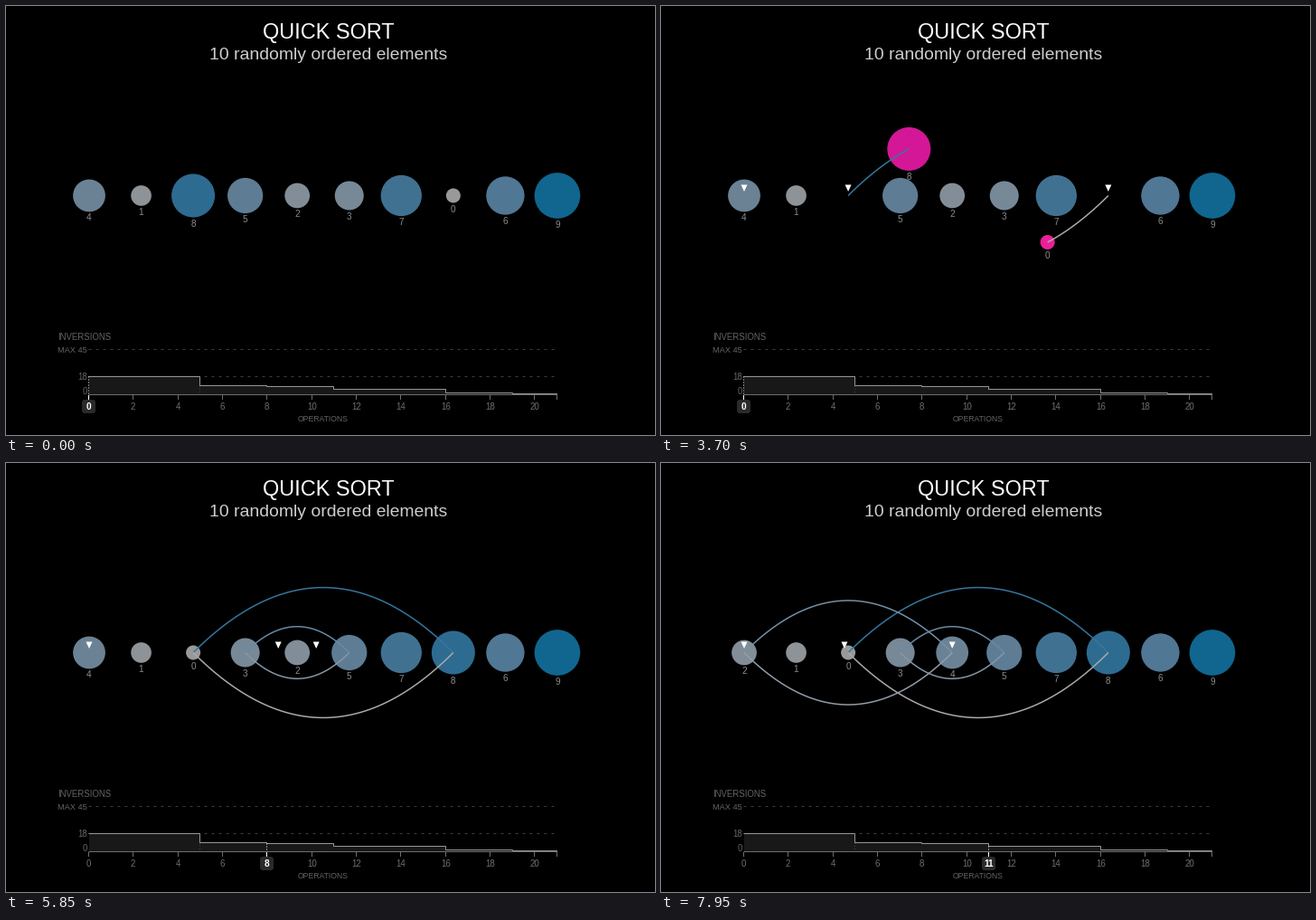
Animation of 718x474 px, one loop 8000 ms. Source, as a matplotlib script:

```python
import numpy as np
import matplotlib.pyplot as plt
from matplotlib.animation import FuncAnimation
from matplotlib.patches import Circle, FancyBboxPatch, Polygon, Rectangle

W, H, DPI = 718, 474, 100
STEP_MS = 50
FRAMES = 160
PX = 72 / DPI
LEFT, GAP, MID = 92, 57.55, 209.5
AXIS_X, OP_W, FLOOR, INV_H = 91.5, 24.66, 429.5, 50 / 45
MOVE = 500
PINK = np.array([255, 0, 153]) / 255

VALUES = [4, 1, 8, 5, 2, 3, 7, 0, 6, 9]
# start time, left slot, right slot, operations done afterwards
SWAPS = [(3506, 2, 7, 5), (5056, 3, 5, 8), (6584, 0, 4, 11)]
# start time and target slot of each hop
TRACKS = [
    [(1390, 0)],
    [(1390, 1), (1930, 2), (4052, 3), (5575, 4), (6077, 5),
     (7085, 1), (7581, 2)],
    [(1390, 10), (1930, 9), (2450, 8), (2975, 7), (4052, 6),
     (4554, 5), (5575, 4)],
]
INVERSIONS = [(0, 18), (5, 9), (8, 8), (11, 5), (16, 2), (19, 1), (21, 0)]

# linear RGB to white-scaled XYZ
XYZ = np.array([[0.4339, 0.3762, 0.1899],
                [0.2126, 0.7152, 0.0722],
                [0.0178, 0.1095, 0.8727]])

plt.rcParams["font.family"] = "Liberation Sans"
fig = plt.figure(figsize=(W / DPI, H / DPI), dpi=DPI, facecolor="black")
ax = fig.add_axes([0, 0, 1, 1])
ax.set_xlim(0, W)
ax.set_ylim(H, 0)
ax.axis("off")


def ease(u):
    u = min(max(u, 0), 1)
    return 4 * u ** 3 if u < 0.5 else 1 - 4 * (1 - u) ** 3


def slot_x(i):
    return LEFT + GAP * i


def crisp(v):
    """Centre of the pixel that holds v."""
    return np.floor(v + 1e-6) + 0.5


def op_x(n):
    return crisp(AXIS_X + OP_W * n)


def inv_y(v):
    return crisp(FLOOR - INV_H * v)


def gray(v):
    return (v / 255,) * 3


def label(x, y, s, size, color, ha="center", **kw):
    return ax.text(x, y, s, fontsize=size * PX, color=color, ha=ha,
                   va="baseline", **kw)


def line(xs, ys, color, width=1, **kw):
    kw.setdefault("solid_capstyle", "butt")
    return ax.plot(xs, ys, color=color, lw=width * PX, snap=False, **kw)[0]


def to_lab(rgb):
    return np.cbrt(XYZ @ ((np.array(rgb) / 255 + 0.055) / 1.055) ** 2.4)


def from_lab(lab):
    lin = np.linalg.solve(XYZ, lab ** 3)
    return np.clip(1.055 * np.clip(lin, 0, 1) ** (1 / 2.4) - 0.055, 0, 1)


def value_color(v):
    low, high = to_lab((153, 153, 153)), to_lab((16, 102, 143))
    return from_lab(low + (high - low) * v / 9)


# Headings
label(357, 36, "QUICK SORT", 23.5, "white")
label(357, 59, "10 randomly ordered elements", 19.4, gray(205))

# Inversions chart
label(57, 369, "INVERSIONS", 9.6, gray(100), "left")
label(90, 383, "MAX 45", 9.3, gray(100), "right")
label(90, 413, "18", 9.8, gray(100), "right")
label(90, 429, "0", 9.8, gray(100), "right")
label(351, 459, "OPERATIONS", 8.6, gray(100))
for v in (45, 18):
    line([op_x(0), op_x(21)], [inv_y(v)] * 2, gray(62), dashes=(3, 5),
         zorder=1)

ops, invs = zip(*INVERSIONS)
xs = np.repeat([op_x(n) for n in ops], 2)[1:]
ys = np.repeat([inv_y(v) for v in invs], 2)[:-1]
ax.fill_between(xs, ys, FLOOR, color=gray(24), lw=0, zorder=1.5)
line([op_x(0), op_x(21)], [FLOOR, FLOOR], gray(110), zorder=2)
line(xs, ys, gray(150), zorder=2, solid_joinstyle="miter")
line([op_x(5)] * 2, [420, 429], gray(70), dashes=(1, 2), zorder=2)

ticks = {}
for n in range(0, 21, 2):
    line([op_x(n)] * 2, [430, 435], gray(110), zorder=2)
    ticks[n] = label(op_x(n), 445.5, str(n), 9.8, gray(110))
line([op_x(21)] * 2, [429, 435], gray(110), zorder=2)

cursor = line([0, 0], [430, 435], "white", zorder=3)
cursor_dots = line([0, 0], [0, 0], "white", dashes=(1, 2), zorder=3)
badge = FancyBboxPatch((0, 437), 11, 11, fc=gray(42), ec="none", zorder=4,
                       boxstyle="round,pad=2,rounding_size=3")
ax.add_patch(badge)
badge_text = label(0, 445.5, "0", 10, "white", weight="bold", zorder=5)

# Sorting stage
clip = Rectangle((57, 70), 600, 280, transform=ax.transData)
colors = {v: value_color(v) for v in VALUES}
balls, names = {}, {}
for v in VALUES:
    balls[v] = Circle((0, MID), 8 * np.sqrt(1 + v), lw=0, zorder=6)
    ax.add_patch(balls[v])
    names[v] = label(0, 0, str(v), 10, gray(140), zorder=6.5)

order = list(VALUES)
moves = []
for start, i, j, done in SWAPS:
    for src, dst, side in ((i, j, -1), (j, i, 1)):
        v = order[src]
        trail = line([], [], colors[v] * 1.12, 1.5, zorder=7)
        moves.append((start, v, src, dst, side, trail))
    order[i], order[j] = order[j], order[i]

markers = []
for _ in TRACKS:
    m = Polygon([(0, 0)] * 3, fc="white", lw=0, zorder=8)
    ax.add_patch(m)
    m.set_clip_path(clip)
    markers.append(m)


def track_slot(hops, t):
    pos = -1
    for start, target in hops:
        pos += (target - pos) * ease((t - start) / MOVE)
    return pos


def arc(src, dst, side, p):
    x = slot_x(src) + (slot_x(dst) - slot_x(src)) * p
    return x, MID + side * GAP * abs(dst - src) * p * (1 - p)


def show_operation(t):
    n = max([0] + [done for start, _, _, done in SWAPS if t >= start + MOVE])
    x = op_x(n)
    cursor.set_xdata([x, x])
    cursor_dots.set_data([x, x], [inv_y(dict(INVERSIONS)[n]), 429])
    badge.set_x(x - 5.5)
    badge_text.set_x(x)
    badge_text.set_text(str(n))
    for k, txt in ticks.items():
        txt.set_visible(k != n)


def draw(frame):
    t = frame * STEP_MS
    place = {v: (slot_x(i), MID) for i, v in enumerate(VALUES)}
    glow = dict.fromkeys(VALUES, 0)
    for start, v, src, dst, side, trail in moves:
        if t < start:
            trail.set_data([], [])
            continue
        p = ease((t - start) / MOVE)
        trail.set_data(*arc(src, dst, side, np.linspace(0, p, 60)))
        place[v] = arc(src, dst, side, p)
        glow[v] = ease((t - start) / 310) - ease((t - start - MOVE) / 250)
    for v, ball in balls.items():
        x, y = place[v]
        ball.center = x, y
        ball.set_facecolor(colors[v] + (PINK - colors[v]) * glow[v])
        names[v].set_position((x, y + ball.radius + 10))
    for m, hops in zip(markers, TRACKS):
        x = slot_x(track_slot(hops, t))
        m.set_xy([(x - 3.5, 197.5), (x + 3.5, 197.5), (x, 205)])
    show_operation(t)
    return []


anim = FuncAnimation(fig, draw, frames=FRAMES, interval=STEP_MS,
                     init_func=lambda: draw(0), repeat=True, repeat_delay=0,
                     blit=False)
plt.show()
```
